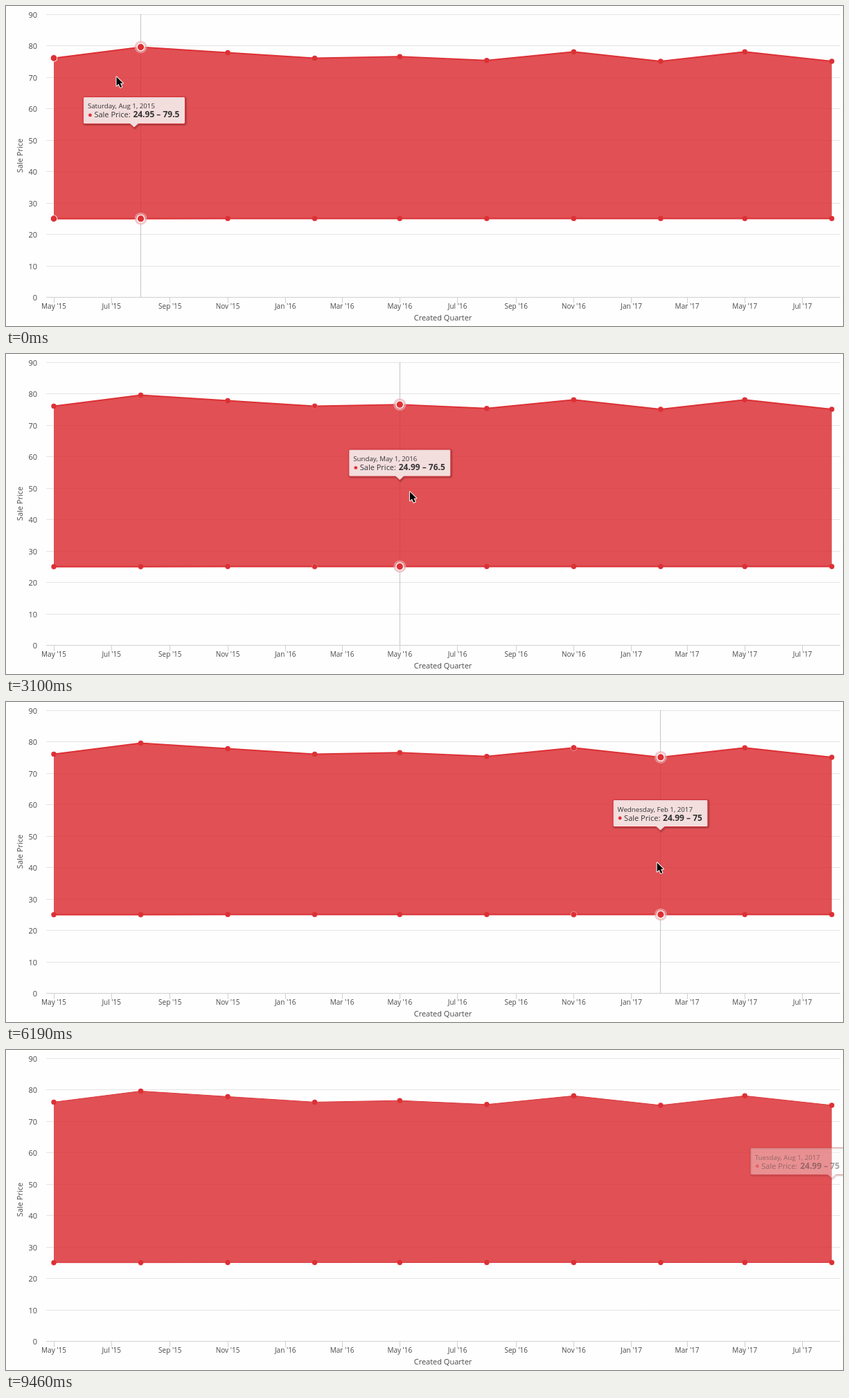
These frames come from a looping animation (1208x463 px, 9.56 s). An HTML page with a canvas:

```html
<!DOCTYPE html>
<html lang="en">
<head>
<meta charset="utf-8">
<title>Sale Price by Created Quarter</title>
<style>
  html, body { margin: 0; height: 100%; overflow: hidden; background: #fefefe; }
  canvas { display: block; }
</style>
</head>
<body>
<canvas id="stage" width="1208" height="463"></canvas>
<script>
const ctx = document.getElementById('stage').getContext('2d');
const LOOP = 9560, STEP = 147.4, LAST = 9460, LEAVE = 9250;
const RED = '#dc3035';
const FONT = '"Open Sans", "Noto Sans", sans-serif';

const month = m => new Date(Date.UTC(2015, 4 + m, 1));
const xAt = date => 69 + (date - month(0)) / 864e5 * 1.3643;
const yAt = v => 421.2 - 4.55 * v;
const format = (date, options) => date.toLocaleDateString('en-US', { timeZone: 'UTC', ...options });

const points = [
  [24.95, 76], [24.95, 79.5], [24.98, 77.75], [24.97, 76], [24.99, 76.5],
  [25, 75.25], [25, 78], [24.99, 75], [24.98, 78], [24.99, 75]
].map(([low, high], i) => {
  const date = month(3 * i);
  return {
    x: xAt(date), low: yAt(low), high: yAt(high),
    title: format(date, { weekday: 'long', month: 'short', day: 'numeric', year: 'numeric' }),
    value: `${low} – ${high}`
  };
});

// When the pointer enters the zone of points 1, 2, 3 ...
const enters = [-203, 600, 1656, 2476, 3900, 4793, 5735, 6640, 7500];

// Pointer path: time, x, y
const path = [
  [0, 159, 102], [600, 257, 124], [1020, 310, 137], [1320, 312, 138], [1656, 382, 150],
  [1910, 438, 161], [2476, 507, 182], [3100, 583, 199], [3900, 631, 207], [4793, 757, 218],
  [5010, 770, 220], [5735, 882, 228], [6190, 939, 232], [7080, 1072, 241], [7500, 1129, 247],
  [7960, 1165, 255], [8120, 1165, 255], [8700, 1160, 330], [9250, 1150, 463]
];

function text(str, x, y, size, { align = 'left', weight = 400, color = '#484848' } = {}) {
  ctx.font = `${weight} ${size}px ${FONT}`;
  ctx.textAlign = align;
  ctx.fillStyle = color;
  ctx.fillText(str, x, y);
}

function line(x1, y1, x2, y2, color) {
  ctx.beginPath();
  ctx.moveTo(x1, y1);
  ctx.lineTo(x2, y2);
  ctx.strokeStyle = color;
  ctx.lineWidth = 1;
  ctx.stroke();
}

function disc(x, y, r, color) {
  ctx.beginPath();
  ctx.arc(x, y, r, 0, 2 * Math.PI);
  ctx.fillStyle = color;
  ctx.fill();
}

function axes() {
  for (let v = 0; v <= 90; v += 10) {
    const y = Math.floor(421.6 - 4.55 * v) + 0.5;
    line(58, y, 1204, y, v ? '#e4e4e4' : '#cfd0d4');
    text(v, 45, y + 4, 11, { align: 'right' });
  }
  for (let m = 0; m <= 26; m += 2) {
    const date = month(m), x = xAt(date), tick = Math.floor(x) + 0.5;
    line(tick, 421, tick, 430, '#cfd0d4');
    const label = `${format(date, { month: 'short' })} '${date.getUTCFullYear() % 100}`;
    text(label, x, 438, 10, { align: 'center' });
  }
  text('Created Quarter', 630.5, 455, 11, { align: 'center' });
  ctx.save();
  ctx.translate(23.5, 216.5);
  ctx.rotate(-Math.PI / 2);
  text('Sale Price', 0, 0, 11, { align: 'center' });
  ctx.restore();
}

function area(lineWidth) {
  ctx.beginPath();
  points.forEach(p => ctx.lineTo(p.x, p.high));
  [...points].reverse().forEach(p => ctx.lineTo(p.x, p.low));
  ctx.fillStyle = 'rgba(218,45,50,.83)';
  ctx.fill();
  ctx.strokeStyle = RED;
  ctx.lineWidth = lineWidth;
  ctx.lineJoin = 'round';
  for (const side of ['high', 'low']) {
    ctx.beginPath();
    points.forEach(p => ctx.lineTo(p.x, p[side]));
    ctx.stroke();
  }
}

// focus runs from 0 (plain) to 1 (hovered)
function marker(p, focus, halo) {
  for (const y of [p.high, p.low]) {
    if (halo) disc(p.x, y, 9, 'rgba(236,170,175,.65)');
    const r = 3.7 + 1.6 * focus;
    disc(p.x, y, r, RED);
    if (focus > 0) {
      ctx.strokeStyle = `rgba(255,255,255,${0.4 + 0.6 * focus})`;
      ctx.lineWidth = 0.4 + 0.9 * focus;
      ctx.stroke();
    }
  }
}

function tooltip(p, from, dt, alpha) {
  ctx.font = `700 12px ${FONT}`;
  const w = 80 + ctx.measureText(p.value).width, h = 39;
  const mid = q => (q.high + q.low) / 2 - 52.2;
  const tip = p.x + (from.x - p.x) * (2 / 3) ** (dt / 32);
  const y = mid(p) + (mid(from) - mid(p)) * 0.5 ** (dt / 32);
  const x = Math.min(tip - w / 2, 1211 - w);

  const box = new Path2D();
  box.moveTo(x + 2, y);
  box.arcTo(x + w, y, x + w, y + h, 2);
  box.arcTo(x + w, y + h, x, y + h, 2);
  box.lineTo(tip + 6, y + h);
  box.lineTo(tip, y + h + 5.5);
  box.lineTo(tip - 6, y + h);
  box.arcTo(x, y + h, x, y, 2);
  box.arcTo(x, y, x + w, y, 2);
  box.closePath();

  ctx.save();
  ctx.globalAlpha = alpha;
  ctx.translate(1, 1);
  for (let i = 1; i <= 3; i++) {
    ctx.strokeStyle = `rgba(0,0,0,${0.05 * i})`;
    ctx.lineWidth = 7 - 2 * i;
    ctx.stroke(box);
  }
  ctx.translate(-1, -1);
  ctx.fillStyle = 'rgba(247,247,247,.85)';
  ctx.fill(box);
  ctx.strokeStyle = RED;
  ctx.lineWidth = 1;
  ctx.stroke(box);

  const color = '#333';
  text(p.title, x + 6.5, y + 17, 9.7, { color });
  disc(x + 10, y + 26.5, 2.4, RED);
  text('Sale Price:', x + 16, y + 30, 11, { color });
  text(p.value, x + 72, y + 30, 12, { weight: 700, color });
  ctx.restore();
}

function pointer(t) {
  const i = path.findIndex(k => k[0] > t);
  if (i < 0) return;
  const [t0, x0, y0] = path[i - 1], [t1, x1, y1] = path[i];
  const k = (t - t0) / (t1 - t0);
  ctx.save();
  ctx.translate(x0 + (x1 - x0) * k + 0.5, y0 + (y1 - y0) * k + 0.5);
  const arrow = new Path2D('M0 0V13L3 10.2L5.4 15.4L7.8 14.4L5.5 9.3H9.3Z');
  ctx.strokeStyle = '#fff';
  ctx.lineWidth = 2;
  ctx.stroke(arrow);
  ctx.fillStyle = '#000';
  ctx.fill(arrow);
  ctx.restore();
}

function draw(t) {
  ctx.fillStyle = '#fefefe';
  ctx.fillRect(0, 0, 1208, 463);
  const cur = enters.filter(e => e <= t).length;
  const dt = t - enters[cur - 1];
  const gone = Math.max(0, t - LEAVE), hovering = gone === 0;

  axes();
  if (hovering) {
    const x = Math.floor(points[cur].x) + 0.5;
    line(x, 12, x, 421, '#c4c4c4');
  }
  area(Math.max(1, 2 - gone / 200));
  points.forEach((p, i) => {
    let focus = 0;
    if (i === cur) focus = Math.max(0, 1 - gone / 200);
    else if (i < cur) focus = Math.max(0, 1 - (t - enters[i]) / 700);
    marker(p, focus, hovering && i === cur);
  });
  tooltip(points[cur], points[cur - 1], dt, 1 - gone / 380);
  pointer(t);
}

// The picture advances in even steps, with one late step before the loop
function frame(now) {
  const t = now % LOOP;
  draw(t >= LAST ? LAST : Math.min(63, Math.floor(t / STEP + 0.06)) * STEP);
  requestAnimationFrame(frame);
}
const start = performance.now();
const run = () => frameAt();
function frameAt() {
  const t = (performance.now() - start) % LOOP;
  draw(t >= LAST ? LAST : Math.min(63, Math.floor(t / STEP + 0.06)) * STEP);
  requestAnimationFrame(run);
}
run();
</script>
</body>
</html>
```
